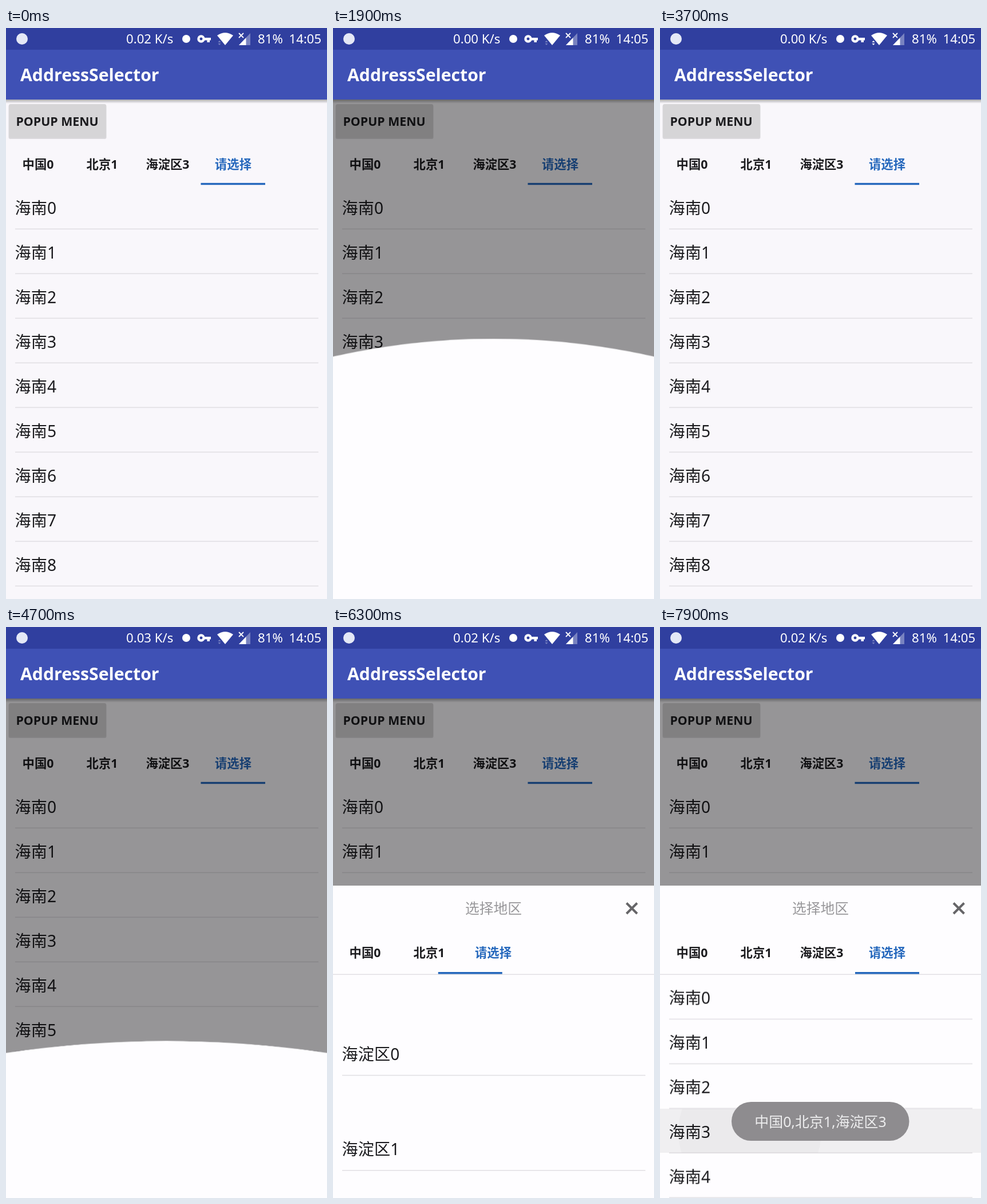
Recreate the animation shown at these times as an HTML page. Size 561 px wide and 998 px high, loop 8 s.

```html
<!DOCTYPE html>
<html lang="zh-CN">
<head>
<meta charset="utf-8">
<title>AddressSelector</title>
<style>
html, body { margin: 0; width: 100%; height: 100%; overflow: hidden; background: #f9f7fb; }
svg { display: block; width: 100%; height: 100%; }
text { font-family: "Noto Sans", "Noto Sans CJK SC", "Noto Sans CJK", sans-serif; fill: #1b1b1e; }
.status text { font-size: 22.2px; fill: #fff; }
.title { font-size: 30.2px; font-weight: 700; fill: #fff; }
.button { font-size: 21.3px; font-weight: 700; }
.tab { font-size: 21.3px; font-weight: 600; text-anchor: middle; }
.tab.pick { fill: #2467bc; }
.bar { fill: #2467bc; }
.item { font-size: 28.2px; }
.line { fill: #e2e0e4; }
.heading { font-size: 24.8px; text-anchor: middle; fill: #99989b; }
.toast text { font-size: 24.9px; text-anchor: middle; fill: #ededee; }

/* one loop is 8 s, so 1% is 80 ms */
.anim { animation: 8s linear infinite; }
.step { animation: 8s step-end infinite; }

.speed2 { animation-name: speed2; }
.speed0 { animation-name: speed0; }
.speed3 { animation-name: speed3; }
@keyframes speed2 { 0% { opacity: 1 } 8.75% { opacity: 0 } 72.5%, 100% { opacity: 1 } }
@keyframes speed0 { 0% { opacity: 0 } 8.75% { opacity: 1 } 52.5%, 100% { opacity: 0 } }
@keyframes speed3 { 0% { opacity: 0 } 52.5% { opacity: 1 } 72.5%, 100% { opacity: 0 } }
.traffic { animation-name: traffic; }
@keyframes traffic {
  0% { opacity: .35 } 41.25% { opacity: 1 } 52.5% { opacity: .35 }
  82.5% { opacity: 1 } 92.5%, 100% { opacity: .35 }
}

.press { animation-name: press; opacity: 0; }
@keyframes press {
  0%, 16.25% { opacity: 0 } 17.5% { opacity: .1 } 20%, 52% { opacity: 0 }
  53% { opacity: .1 } 57%, 100% { opacity: 0 }
}
.dim { animation-name: dim; }
@keyframes dim {
  0%, 17.5% { opacity: 0 } 20%, 41.25% { opacity: .4 } 45%, 53.125% { opacity: 0 }
  55.625%, 100% { opacity: .4 }
}

.sheet { animation-name: rise; }
@keyframes rise {
  0% { transform: translateY(624px) }
  19.3375% { transform: translateY(624px); animation-timing-function: cubic-bezier(.3642, 0, .6358, 1) }
  25.5875% { transform: none; opacity: 1 }
  41.25% { transform: none; opacity: 1 }
  45% { transform: none; opacity: 0 }
  45.01% { transform: translateY(624px); opacity: 1 }
  55.5125% { transform: translateY(624px); animation-timing-function: cubic-bezier(.3642, 0, .6358, 1) }
  61.7625%, 100% { transform: none; opacity: 1 }
}
.arc { animation: arc 8s cubic-bezier(.3642, 0, .6358, 1) infinite; transform-origin: 0 452px; }
@keyframes arc {
  0%, 19.3375% { transform: scaleY(0) } 25.5875%, 27.5625% { transform: scaleY(1) }
  33.8125%, 55.5125% { transform: scaleY(0) } 61.7625%, 63.75% { transform: scaleY(1) }
  70%, 100% { transform: scaleY(0) }
}
.content { animation-name: content; }
@keyframes content {
  0% { opacity: 0 } 26.875% { opacity: 1 } 45% { opacity: 0 } 63.125%, 100% { opacity: 1 }
}

.level0 { animation-name: level0; }
.level1 { animation-name: level1; }
.level2 { animation-name: level2; }
.level3 { animation-name: level3; }
@keyframes level0 { 0% { opacity: 1 } 72.25%, 100% { opacity: 0 } }
@keyframes level1 { 0% { opacity: 0 } 72.25% { opacity: 1 } 77.625%, 100% { opacity: 0 } }
@keyframes level2 { 0% { opacity: 0 } 77.625% { opacity: 1 } 83%, 100% { opacity: 0 } }
@keyframes level3 { 0% { opacity: 0 } 83%, 100% { opacity: 1 } }
.slider { animation-name: slider; }
@keyframes slider {
  0%, 72.25% { transform: none } 74%, 77.625% { transform: translateX(112px) }
  79.4%, 83% { transform: translateX(224px) } 84.7%, 100% { transform: translateX(341px) }
}
/* rows come from below, overshoot upwards and settle */
.enter { animation: enter 8s linear infinite backwards; }
@keyframes enter {
  0% { transform: translateY(382px); animation-timing-function: cubic-bezier(.3333, 1.5, .6667, 1) }
  5%, 90% { transform: none }
  90.01%, 100% { transform: translateY(382px) }
}

.touch { animation-name: touch; }
@keyframes touch { 0%, 95.5% { opacity: 0 } 97.5%, 100% { opacity: 1 } }
.ripple { animation-name: ripple; transform-origin: 157px 882px; }
@keyframes ripple { 0%, 95.5% { transform: scale(0) } 98.75%, 100% { transform: scale(1) } }
.toast { animation-name: toast; }
@keyframes toast { 0%, 97.25% { opacity: 0 } 98.75%, 100% { opacity: 1 } }
</style>
</head>
<body>
<svg viewBox="0 0 561 998" preserveAspectRatio="none">
  <defs>
    <clipPath id="listClip"><rect y="608" width="561" height="390"/></clipPath>
    <clipPath id="rowClip"><rect y="842" width="561" height="77"/></clipPath>
    <linearGradient id="shade" x2="0" y2="1">
      <stop stop-color="#000" stop-opacity=".3"/>
      <stop offset="1" stop-color="#000" stop-opacity="0"/>
    </linearGradient>
  </defs>

  <rect width="561" height="998" fill="#f9f7fb"/>
  <rect x="4.5" y="134" width="171" height="60" rx="3" fill="#000" opacity=".12"/>
  <rect x="5" y="133" width="170" height="59" rx="3" fill="#d6d5d7"/>
  <rect class="press anim" x="5" y="133" width="170" height="59" rx="3"/>
  <text class="button" x="17.5" y="170.5">POPUP MENU</text>
  <g id="page"></g>
  <rect class="bar" x="340.5" y="270.8" width="112.5" height="3.4"/>
  <rect class="dim anim" y="125" width="561" height="873"/>

  <rect y="125" width="561" height="7" fill="url(#shade)"/>
  <rect y="37" width="561" height="88" fill="#3f51b5"/>
  <rect width="561" height="38" fill="#303f9f"/>
  <text class="title" x="25" y="93">AddressSelector</text>

  <g class="status" fill="#fff">
    <circle cx="28" cy="19" r="10" fill="#e4e8f6"/>
    <text class="speed2 step" x="210" y="27">0.02 K/s</text>
    <text class="speed0 step" x="210" y="27">0.00 K/s</text>
    <text class="speed3 step" x="210" y="27">0.03 K/s</text>
    <circle cx="315" cy="19" r="7"/>
    <circle cx="341" cy="19" r="4.6" fill="none" stroke="#fff" stroke-width="4.2"/>
    <path d="M346 17H358V21.5H356V25H351.5V21.5H346Z"/>
    <path d="M369 13Q383 3.5 397 13L383 30Z"/>
    <path class="traffic step" d="M370.5 25L373 22L375.5 25ZM370.5 27L373 30L375.5 27Z"/>
    <path d="M407 30L427 9V30Z" opacity=".35"/>
    <path d="M407 30L419.5 17V30Z"/>
    <path d="M407 9L415 17M415 9L407 17" stroke="#fff" stroke-width="1.8"/>
    <text x="440" y="27">81%</text>
    <text x="494.5" y="27">14:05</text>
  </g>

  <g class="sheet anim">
    <path class="arc" d="M0 452Q280.5 374 561 452V460H0Z" fill="#fefdff"/>
    <rect y="452" width="561" height="550" fill="#fefdff"/>
    <g class="content step">
      <text class="heading" x="280.5" y="501">选择地区</text>
      <path d="M513 482.5L531.5 501M531.5 482.5L513 501" stroke="#666568" stroke-width="4"/>
      <rect class="line" y="606.5" width="561" height="1.5"/>
      <g id="levels"></g>
      <rect class="bar slider anim" y="603" width="112" height="3.5"/>
      <g class="touch anim" clip-path="url(#rowClip)">
        <rect y="842" width="561" height="77" opacity=".055"/>
        <circle class="ripple anim" cx="157" cy="882" r="125" opacity=".022"/>
      </g>
    </g>
  </g>

  <g class="toast anim">
    <rect x="125" y="830" width="310.5" height="68" rx="34" fill="#8e8c8f"/>
    <text x="280.5" y="873.5">中国0,北京1,海淀区3</text>
  </g>
</svg>
<script>
const places = ['中国', '北京', '海淀区', '海南'];
const chosen = ['中国0', '北京1', '海淀区3'];
const centers = [56, 168, 282.5, 397];
const starts = [0, 5780, 6210, 6640];

const tabs = (level, y) =>
  chosen.slice(0, level)
    .map((name, i) => `<text class="tab" x="${centers[i]}" y="${y}">${name}</text>`).join('') +
  `<text class="tab pick" x="${level === 2 ? 280 : centers[level]}" y="${y}">请选择</text>`;

const rows = (level, top, count, start) =>
  Array.from({ length: count }, (_, i) => {
    const y = top + 78 * i;
    const motion = start ? `class="enter" style="animation-delay:${start + 36 * i}ms"` : '';
    return `<g ${motion}><text class="item" x="15.6" y="${y + 51}">${places[level]}${i}</text>
      <rect class="line" x="16" y="${y + 76.5}" width="530" height="1.6"/></g>`;
  }).join('');

document.getElementById('page').innerHTML = tabs(3, 245.5) + rows(3, 274, 9);
document.getElementById('levels').innerHTML = starts.map((start, level) =>
  `<g class="level${level} step">${tabs(level, 577)}
    <g clip-path="url(#listClip)">${rows(level, 608, 5, start)}</g></g>`).join('');
</script>
</body>
</html>
```
